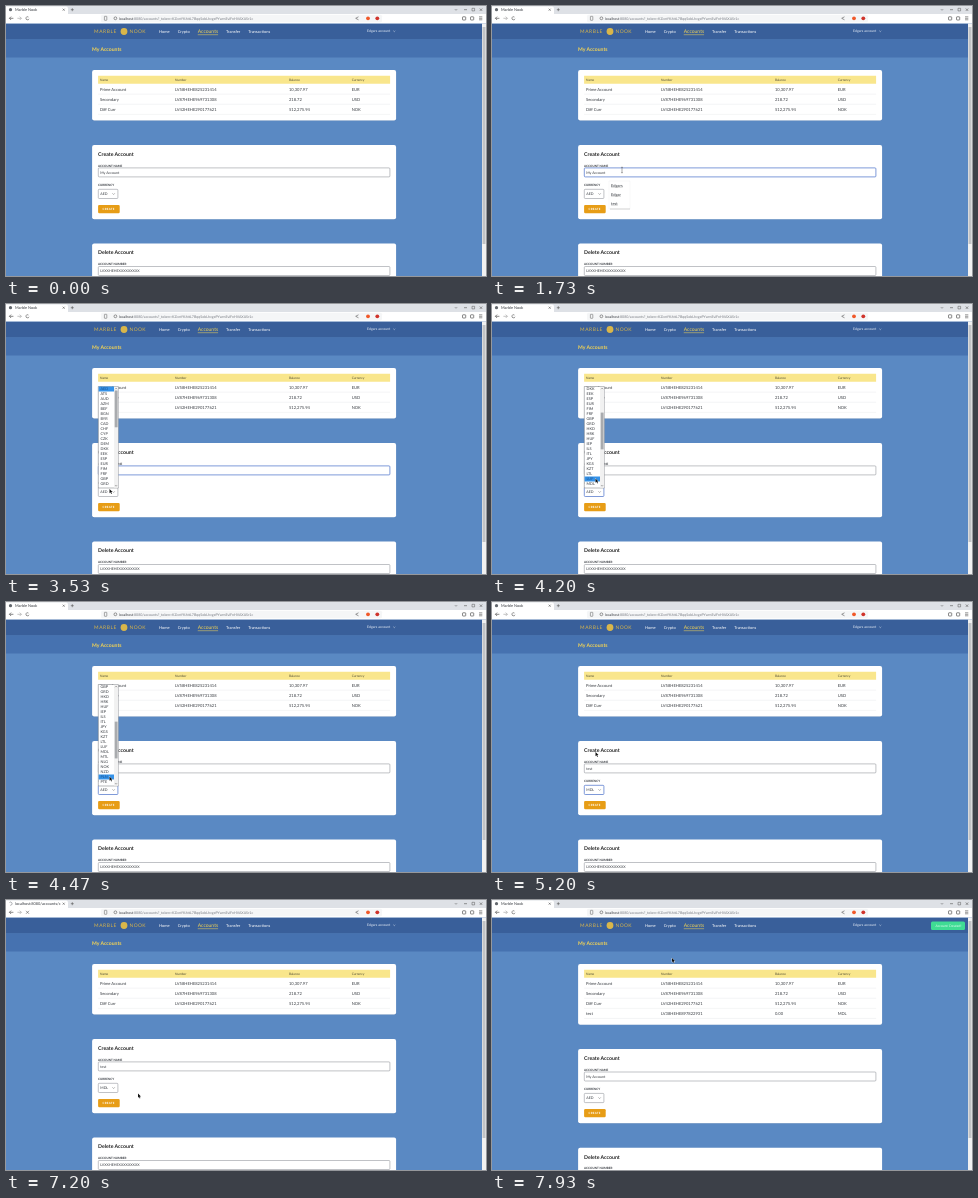
Write an HTML page with a canvas that moves like this. It is 480 px wide and 270 px high and loops after 8 s.

```html
<!DOCTYPE html>
<html lang="en">
<head>
<meta charset="utf-8">
<title>Marble Nook</title>
<style>
  html, body { margin: 0; width: 100%; height: 100%; overflow: hidden; background: #5a89c3; }
  canvas { display: block; width: 480px; height: 270px; }
</style>
</head>
<body>
<canvas id="stage"></canvas>
<script>
const DURATION = 8000;
const canvas = document.getElementById('stage');
const ctx = canvas.getContext('2d');
const ratio = window.devicePixelRatio || 1;
canvas.width = 480 * ratio;
canvas.height = 270 * ratio;

const INK = '#34383e', GREY = '#777b82', ICON = '#555', GOLD = '#f6d552', FOCUS = '#5f80d0';

const COLUMNS = { Name: 94, Number: 169, Balance: 283, Currency: 345.7 };
const ACCOUNTS = [
  ['Prime Account', 'LV58HEHE825231414', '10,307.97', 'EUR'],
  ['Secondary', 'LV87HEHE969731308', '218.72', 'USD'],
  ['Diff Curr', 'LV42HEHE290177621', '512,275.94', 'NOK'],
  ['test', 'LV38HEHE897822931', '0.00', 'MDL'],
];
const CURRENCIES = ('AED ATS AUD AZM BEF BGN BYR CAD CHF CYP CZK DEM DKK EEK ESP EUR FIM FRF GBP GRD ' +
  'HKD HRK HUF IEP ILS ITL JPY KGS KZT LTL LUF MDL MTL NLG NOK NZD PLN PTE').split(' ');

// Page layout: cards stacked with equal gaps
const LEFT = 86.1, WIDTH = 304, PAD = 6, GAP = 24.4, ROW = 10.1;
const INNER = LEFT + PAD, INNER_WIDTH = WIDTH - 2 * PAD;
const TABLE_TOP = 64.1, FORM_HEIGHT = 74.2;
const LIST_TOP = 82.5, LIST_ROW = 5, LIST_SIZE = 20, SCROLL_ROWS = 18;
const listRow = i => LIST_TOP + (i + 0.5) * LIST_ROW;

// Moments of the interaction, in ms
const AT = {
  appear: 400, focusName: 1130, suggest: 1200, type: 1870, suggestEnd: 2400,
  openList: 3470, focusSelect: 3600, scroll: 3870, scrollEnd: 4470, pick: 5000,
  hover: 5800, leave: 6500, loading: 6400, loaded: 7330,
};

// The pointer glides to each place, taking TRAVEL ms to get there
const TRAVEL = 400;
const START = { x: 204, y: 27 };
const STOPS = [
  { at: 1100, x: 130, y: 164 },
  { at: 3300, x: 103.5, y: 185 },
  { at: 3940, x: 103.5, y: listRow(18) - 0.5 },
  { at: 4900, x: 103.5, y: listRow(CURRENCIES.indexOf('MDL') - SCROLL_ROWS) },
  { at: 5900, x: 107, y: 202 },
  { at: 6780, x: 132, y: 193.5 },
  { at: 7930, x: 180, y: 58 },
];

const clamp = (v, lo, hi) => Math.max(lo, Math.min(hi, v));
const between = (t, from, to) => t >= from && t < to;

function pointerAt(t) {
  let { x, y } = START;
  for (const stop of STOPS) {
    const u = clamp((t - stop.at) / TRAVEL + 1, 0, 1), k = u * u * (3 - 2 * u);
    x += (stop.x - x) * k;
    y += (stop.y - y) * k;
  }
  return { x, y };
}

function paint(fill, stroke, width) {
  if (fill) { ctx.fillStyle = fill; ctx.fill(); }
  if (stroke) { ctx.strokeStyle = stroke; ctx.lineWidth = width; ctx.stroke(); }
}

function rect(x, y, w, h, fill, radius = 0, stroke, width = 0.5) {
  ctx.beginPath();
  ctx.roundRect(x, y, w, h, radius);
  paint(fill, stroke, width);
}

function arc(x, y, r, fill, stroke, from = 0, to = 2 * Math.PI) {
  ctx.beginPath();
  ctx.arc(x, y, r, from, to);
  paint(fill, stroke, 0.6);
}

function line(color, width, ...points) {
  ctx.beginPath();
  for (let i = 0; i < points.length; i += 2) ctx.lineTo(points[i], points[i + 1]);
  paint(null, color, width);
}

// Returns the x position where the text ends
function text(str, x, y, size, color = INK, weight = 400, spacing = 0) {
  ctx.font = `${weight} ${size}px Lato, sans-serif`;
  ctx.letterSpacing = spacing + 'px';
  ctx.fillStyle = color;
  ctx.fillText(str, x, y + size * 0.36);
  return x + ctx.measureText(str).width;
}

function cross(x, y, r) {
  line(ICON, 0.6, x - r, y - r, x + r, y + r);
  line(ICON, 0.6, x - r, y + r, x + r, y - r);
}

// dir is 1 for pointing down, -1 for up
const chevron = (x, y, color, r = 1.2, dir = 1) =>
  line(color, 0.5, x - r, y - dir * r / 2, x, y + dir * r / 2, x + r, y - dir * r / 2);

// dir is 1 for right, -1 for left
function arrow(x, y, dir, color) {
  line(color, 0.7, x - dir * 2, y, x + dir * 2, y);
  line(color, 0.7, x + dir * 0.3, y - 1.7, x + dir * 2, y, x + dir * 0.3, y + 1.7);
}

function drawTabs(t, loading) {
  const y = 3.7;
  rect(0, 0, 480, 8, '#dee1e6');
  rect(0, 0.5, 62, 8, '#fff', [0, 2, 0, 0]);
  if (loading) arc(4.5, y, 1.6, null, GREY, t / 150, t / 150 + 4);
  else arc(4.5, y, 1.6, '#62676d');
  text(loading ? 'localhost:8080/accounts/c' : 'Marble Nook', 9, y, 3.9);
  cross(57.7, y, 1);
  line(ICON, 0.6, 64.8, y, 67.8, y);
  line(ICON, 0.6, 66.3, y - 1.5, 66.3, y + 1.5);
  chevron(450, y, ICON);
  line(ICON, 0.6, 458, y, 461, y);
  rect(466, y - 1.4, 2.6, 2.6, null, 0, ICON);
  cross(475, y, 1.2);
}

function drawToolbar(loading) {
  const y = 12.3;
  rect(0, 8, 480, 9.5, '#fff');
  rect(95, 8.8, 281, 7.4, '#f5f6f7', 1.5);
  arrow(5.4, y, -1, ICON);
  arrow(13.4, y, 1, '#aaa');
  if (loading) cross(21.5, y, 1.5);
  else arc(21.5, y, 1.6, null, ICON, 0.3, 5.4);
  rect(98.4, y - 2, 2.4, 4, null, 0.4, ICON);
  arc(109.4, y, 1.4, null, ICON);
  const hostEnd = text('localhost', 113, y, 3.6);
  text(':8080/accounts?_token=KZcmYK6ttL7BqqSobLhvgePYwmEviFnHVAXASr1c', hostEnd, y, 3.6, GREY);
  line(ICON, 0.6, 352.5, y - 1.5, 349.7, y, 352.5, y + 1.5);
  arc(362, y, 1.9, '#f1592a');
  arc(371.3, y, 1.9, '#d0342c');
  for (const x of [456.5, 464.5]) rect(x, y - 1.5, 3.2, 3.2, null, 0.5, ICON, 0.7);
  for (const dy of [-1.5, 0, 1.5]) line(ICON, 0.6, 473, y + dy, 476.3, y + dy);
}

function drawHeader() {
  const y = 25.5;
  rect(0, 17.5, 480, 16, '#395f9a');
  rect(0, 33.5, 480, 18, '#4672b0');
  arc(118, y, 3.4, '#d9b64a');
  text('MARBLE', 88, y, 4.9, '#d9b64a', 400, 0.6);
  text('NOOK', 123.5, y, 4.9, '#d9b64a', 400, 0.4);
  let x = 153;
  for (const label of ['Home', 'Crypto', 'Accounts', 'Transfer', 'Transactions']) {
    const active = label === 'Accounts';
    const end = text(label, x, y, active ? 5 : 4, active ? GOLD : '#fff');
    if (active) line(GOLD, 0.5, x, y + 3.2, end, y + 3.2);
    x = end + 8;
  }
  text('Edgars account', 361, y - 0.3, 3.5, '#e8eef7');
  chevron(388.3, y - 0.3, '#e8eef7', 0.9);
  text('My Accounts', LEFT, 42.8, 5.1, GOLD, 700);
}

function card(y, h, title) {
  rect(LEFT, y + 0.4, WIDTH, h, 'rgba(30,60,110,.2)', 2);
  rect(LEFT, y, WIDTH, h, '#fff', 2);
  if (title) text(title, INNER, y + 9, 5.2, '#222', 700);
}

function control(x, y, w, h, value, focused) {
  rect(x + 0.2, y, w, h, '#fff', 0.9, focused ? FOCUS : '#80858c', focused ? 0.8 : 0.5);
  return text(value, x + 2.2, y + h / 2, 3.6);
}

function labelled(label, y, value, focused) {
  text(label, INNER, y + 20.6, 3, INK, 700);
  return control(INNER, y + 22.9, INNER_WIDTH - 0.4, 9, value, focused);
}

// Returns the bottom edge of the card
function drawTable(rows) {
  const h = 20.2 + rows.length * ROW;
  card(TABLE_TOP, h);
  rect(INNER, TABLE_TOP + 5.6, INNER_WIDTH, 8, '#f9e68c');
  const xs = Object.values(COLUMNS);
  Object.keys(COLUMNS).forEach((label, i) => text(label, xs[i], TABLE_TOP + 9.7, 3.2, '#4c4a35'));
  rows.forEach((row, r) => {
    const y = TABLE_TOP + 19 + r * ROW;
    row.forEach((value, i) => text(value, xs[i], y, 4.1));
    line('#e3e5e8', 0.4, INNER, y + ROW / 2, INNER + INNER_WIDTH, y + ROW / 2);
  });
  return TABLE_TOP + h;
}

function drawCreateForm(t, y, loaded) {
  card(y, FORM_HEIGHT, 'Create Account');
  const letters = loaded ? 0 : clamp(Math.ceil((t - AT.type) / 133), 0, 4);
  const nameFocused = between(t, AT.focusName, AT.focusSelect);
  const end = labelled('ACCOUNT NAME', y, 'test'.slice(0, letters) || 'My Account', nameFocused);
  const blinkStart = t < AT.type ? AT.suggest : AT.suggestEnd;
  if (nameFocused && Math.floor((t - blinkStart) / 530) % 2 === 0) {
    const x = letters ? end + 0.5 : INNER + 2;
    line('#222', 0.4, x, y + 25, x, y + 30);
  }

  text('CURRENCY', INNER, y + 40.3, 3, INK, 700);
  const selectFocused = between(t, AT.focusSelect, AT.loading);
  const currency = t >= AT.pick && !loaded ? 'MDL' : 'AED';
  control(INNER, y + 44.3, 19.6, 9.2, currency, selectFocused);
  chevron(INNER + 15.5, y + 48.9, '#666');

  const hover = between(t, AT.hover, AT.leave);
  rect(INNER, y + 59.9, 21.6, 8.3, hover ? '#f6ad2b' : '#e79d16', 1.2);
  text('CREATE', INNER + 4.5, y + 64, 2.9, hover ? '#fde3b0' : '#fff', 700, 0.25);
}

function drawDeleteForm(y) {
  card(y, FORM_HEIGHT, 'Delete Account');
  labelled('ACCOUNT NUMBER', y, 'LVXXHEHEXXXXXXXXX', false);
}

function drawSuggestions(t) {
  const x = 117, y = 175, rowHeight = 9;
  const items = ['Edgars', 'Edgar', 'test'].filter(item => t < AT.type || item.startsWith('t'));
  const h = items.length * rowHeight + 1;
  rect(x, y, 21, h, '#fff', 0.5, '#eceef0', 0.4);
  line('#aaa', 0.5, x + 1, y + h, x + 21, y + h);
  items.forEach((item, i) => {
    const mid = y + 4.2 + i * rowHeight, end = text(item, x + 2, mid, 4);
    line('#999', 0.3, x + 2, mid + 2.3, end, mid + 2.3);
  });
}

function drawList(t, pointerY) {
  const notch = clamp(Math.ceil((t - AT.scroll) / (AT.scrollEnd - AT.scroll) * 6), 0, 6);
  const first = notch * SCROLL_ROWS / 6;
  const hovered = clamp(Math.floor((pointerY - LIST_TOP) / LIST_ROW), 0, LIST_SIZE - 1);
  const active = t < AT.focusSelect ? 0 : hovered;
  const h = LIST_SIZE * LIST_ROW, track = h - 8;
  rect(INNER + 0.2, LIST_TOP, 20, h + 1.5, '#fff', 0, '#6c7076');
  CURRENCIES.slice(first, first + LIST_SIZE).forEach((code, i) => {
    const y = listRow(i);
    if (i === active) rect(INNER + 0.5, y - 2.5, 15.4, LIST_ROW, '#3592e8');
    text(code, INNER + 2.4, y, 3.8, i === active ? '#1c548f' : INK);
  });
  rect(INNER + 16, LIST_TOP + 0.3, 4, h + 0.9, '#f1f1f1');
  rect(INNER + 16.6, LIST_TOP + 4 + first / 50 * track, 2.9, track * 0.4, '#a9abae');
  chevron(INNER + 18, LIST_TOP + 2.2, ICON, 1, -1);
  chevron(INNER + 18, LIST_TOP + h - 0.8, ICON, 1);
}

function drawToast() {
  rect(439, 21.5, 34, 8.6, '#3fdc94', 1.5);
  text('Account Created!', 443.5, 25.8, 3.4, '#e4fff2');
}

const ARROW = new Path2D('M0 0V4.2L1 3.3 1.7 4.9 2.4 4.6 1.7 3.1H3Z');
const HAND = new Path2D('M-.4 0Q.2-.6.7 0V1.8L2.5 2.3V4L1.8 5.2H-.2L-1.6 3 -.4 3Z');

function drawPointer(t, { x, y }) {
  if (between(t, AT.focusName - 100, 2950)) {
    line('#555', 0.5, x, y - 2.7, x, y + 2.7);
    for (const end of [y - 2.7, y + 2.7]) line('#555', 0.5, x - 0.9, end, x + 0.9, end);
    return;
  }
  const hand = between(t, AT.hover, AT.leave);
  ctx.save();
  ctx.translate(x, y);
  ctx.lineWidth = 0.6;
  ctx.strokeStyle = hand ? '#222' : '#fff';
  ctx.fillStyle = hand ? '#fff' : '#111';
  ctx.stroke(hand ? HAND : ARROW);
  ctx.fill(hand ? HAND : ARROW);
  ctx.restore();
}

function draw(t) {
  ctx.setTransform(ratio, 0, 0, ratio, 0, 0);
  ctx.textRendering = 'geometricPrecision';
  const loaded = t >= AT.loaded;
  const loading = t >= AT.loading && !loaded;
  const pointer = pointerAt(t);

  rect(0, 17, 480, 253, '#5a89c3');
  drawHeader();
  const createTop = drawTable(ACCOUNTS.slice(0, loaded ? 4 : 3)) + GAP;
  drawCreateForm(t, createTop, loaded);
  drawDeleteForm(createTop + FORM_HEIGHT + GAP);
  if (between(t, AT.suggest, AT.suggestEnd)) drawSuggestions(t);
  if (between(t, AT.openList, AT.pick)) drawList(t, pointer.y);
  if (loaded) drawToast();

  rect(476, 17.5, 4, 252.5, '#f1f1f1');
  rect(476.5, 21, 3, 217, '#c1c3c6');
  drawTabs(t, loading);
  drawToolbar(loading);
  if (t >= AT.appear) drawPointer(t, pointer);
}

function tick(now) {
  draw(now % DURATION);
  requestAnimationFrame(tick);
}
requestAnimationFrame(tick);
</script>
</body>
</html>
```
